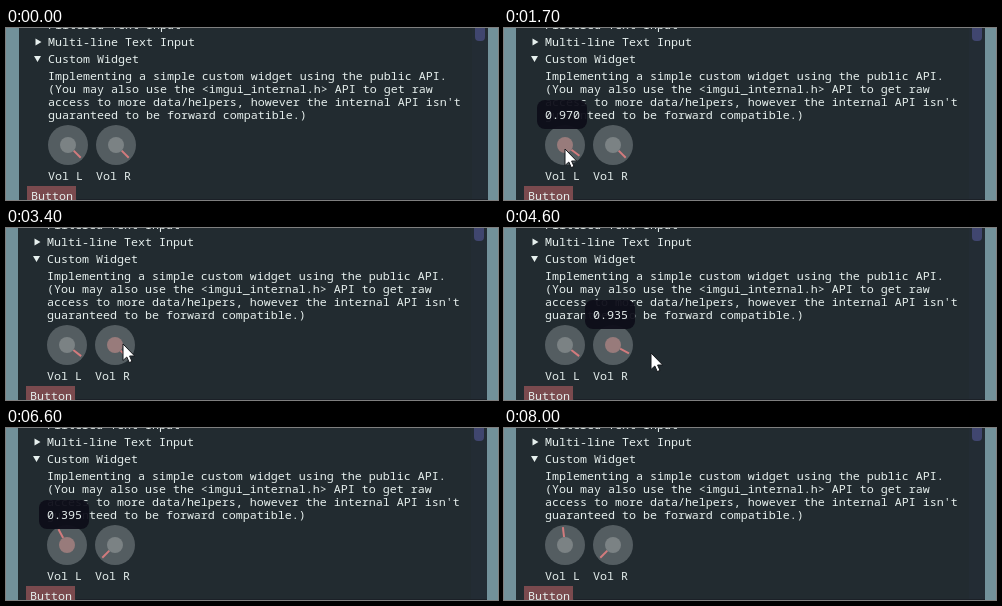
Write an HTML page that moves like this. It is 492 px wide and 172 px high and loops after 8.2 s.

```html
<!DOCTYPE html>
<html lang="en">
<head>
<meta charset="utf-8">
<title>Custom widget</title>
<style>
  html, body { margin: 0; width: 100%; height: 100%; overflow: hidden; background: #72919a; }
  svg { display: block; width: 492px; height: 172px; }
  text {
    font: 11.667px "Noto Sans Mono", "Liberation Mono", monospace;
    fill: #e6efed;
    white-space: pre;
  }
</style>
</head>
<body>
<svg id="stage" viewBox="0 0 492 172"></svg>
<script>
const LOOP = 8200, STEP = 100;
const stage = document.getElementById('stage');

function add(parent, tag, attrs, text) {
  const el = document.createElementNS('http://www.w3.org/2000/svg', tag);
  for (const k in attrs) el.setAttribute(k, attrs[k]);
  if (text) el.textContent = text;
  parent.appendChild(el);
  return el;
}
const rect = (p, x, y, width, height, fill, rx = 0) =>
  add(p, 'rect', { x, y, width, height, fill, rx });
const label = (p, x, y, s) => add(p, 'text', { x, y }, s);

// Window
rect(stage, 0, 0, 492, 172, '#72919a');
const win = add(stage, 'g', {});
rect(win, 12, 0, 469, 172, '#222b30');
rect(win, 465, 0, 16, 172, '#232c34');
rect(win, 468, -10, 10, 23, '#40466f', 4);
rect(win, 70, 171, 411, 1, '#1b2027');

label(win, 41, 1, 'Filtered Text Input');
label(win, 41, 18, 'Multi-line Text Input');
label(win, 41, 35, 'Custom Widget');
add(win, 'path', { d: 'M28.5 10.5L34.5 14L28.5 17.5ZM27 28H34L30.5 34Z', fill: '#e6efed' });
[
  'Implementing a simple custom widget using the public API.',
  '(You may also use the <imgui_internal.h> API to get raw',
  'access to more data/helpers, however the internal API isn\'t',
  'guaranteed to be forward compatible.)'
].forEach((s, i) => label(win, 41, 52 + 13 * i, s));
rect(win, 20, 158, 49, 14, '#7a4a4e');
label(win, 24, 172, 'Button');

// Knobs
function makeKnob(x, name) {
  const g = add(win, 'g', { transform: `translate(${x + 20} 117)` });
  add(g, 'circle', { r: 20, fill: '#545d61' });
  const hand = add(g, 'line', { x1: 8, x2: 18, stroke: '#d27b7d', 'stroke-width': 2 });
  const hub = add(g, 'circle', { r: 8 });
  label(win, x, 152, name);
  return { x, hand, hub };
}
const knobs = [makeKnob(41, 'Vol L'), makeKnob(89, 'Vol R')];
for (const k of knobs) {
  k.tip = add(win, 'g', {});
  rect(k.tip, k.x - 8, 72, 50, 29, 'rgba(13,13,25,.94)', 8);
  k.num = label(k.tip, k.x, 91, '');
}

const cursor = add(stage, 'path', {
  d: 'M0 0V16.5L3.8 13L6.3 18.6L9 17.4L6.6 12H11.7Z',
  fill: '#fff', stroke: '#15181c', 'stroke-width': 1
});

// Pointer stops: time, x, y
const stops = [
  [200, 260, -24], [900, 84, 129], [1200, 67, 121], [1600, 67, 121], [2300, -49, 126],
  [2500, -43, 127], [3000, 131, 131], [3200, 126, 127], [3400, 117, 116], [3500, 117, 116],
  [4000, -40, 126], [4200, -30, 126], [4500, 160, 126], [4600, 147, 125], [5000, -60, 122],
  [5400, -60, 120], [5700, 62, 118], [6400, -56, 122], [6600, -54, 123], [6800, -38, 124],
  [7400, 198, 102], [8000, 506, 29]
];
const drags = [
  { knob: 0, from: 1200, to: 3200 },
  { knob: 1, from: 3500, to: 5400 },
  { knob: 0, from: 5700, to: 6800 }
];

function pointer(t) {
  const i = stops.findIndex(s => s[0] > t);
  if (i < 1) return (i ? stops[stops.length - 1] : stops[0]).slice(1);
  const a = stops[i - 1], b = stops[i];
  const u = (t - a[0]) / (b[0] - a[0]), e = u * u * (3 - 2 * u);
  return [1, 2].map(c => Math.round(a[c] + (b[c] - a[c]) * e));
}

// Replay the drags up to t: each pixel moves the value by 0.005
function stateAt(t) {
  const v = [1, 1];
  for (const { knob, from, to } of drags) {
    for (let s = from + STEP; s <= t && s < to; s += STEP) {
      const dx = pointer(s)[0] - pointer(s - STEP)[0];
      v[knob] = Math.min(1, Math.max(0, v[knob] + dx / 200));
    }
    // The release step still counts
    if (t >= to) {
      const dx = pointer(to)[0] - pointer(to - STEP)[0];
      v[knob] = Math.min(1, Math.max(0, v[knob] + dx / 200));
    }
  }
  return v;
}

function draw(time) {
  const t = Math.floor((time % LOOP) / STEP) * STEP;
  const [x, y] = pointer(t);
  const v = stateAt(t);
  const drag = drags.find(d => t >= d.from && t < d.to);

  win.setAttribute('transform', `translate(${t < 200 ? 1 : 0} 0)`);
  cursor.setAttribute('transform', `translate(${x} ${y})`);
  knobs.forEach((k, i) => {
    const active = drag && drag.knob === i;
    const over = !drag && x >= k.x && x < k.x + 40 && y >= 97 && y < 154;
    k.hand.setAttribute('transform', `rotate(${135 + 270 * v[i]})`);
    k.hub.setAttribute('fill', active || over ? '#987b7b' : '#7b8284');
    k.tip.setAttribute('visibility', active ? 'visible' : 'hidden');
    k.num.textContent = v[i].toFixed(3);
  });
}

const start = performance.now();
function tick() {
  draw(performance.now() - start);
  requestAnimationFrame(tick);
}
tick();
</script>
</body>
</html>
```
